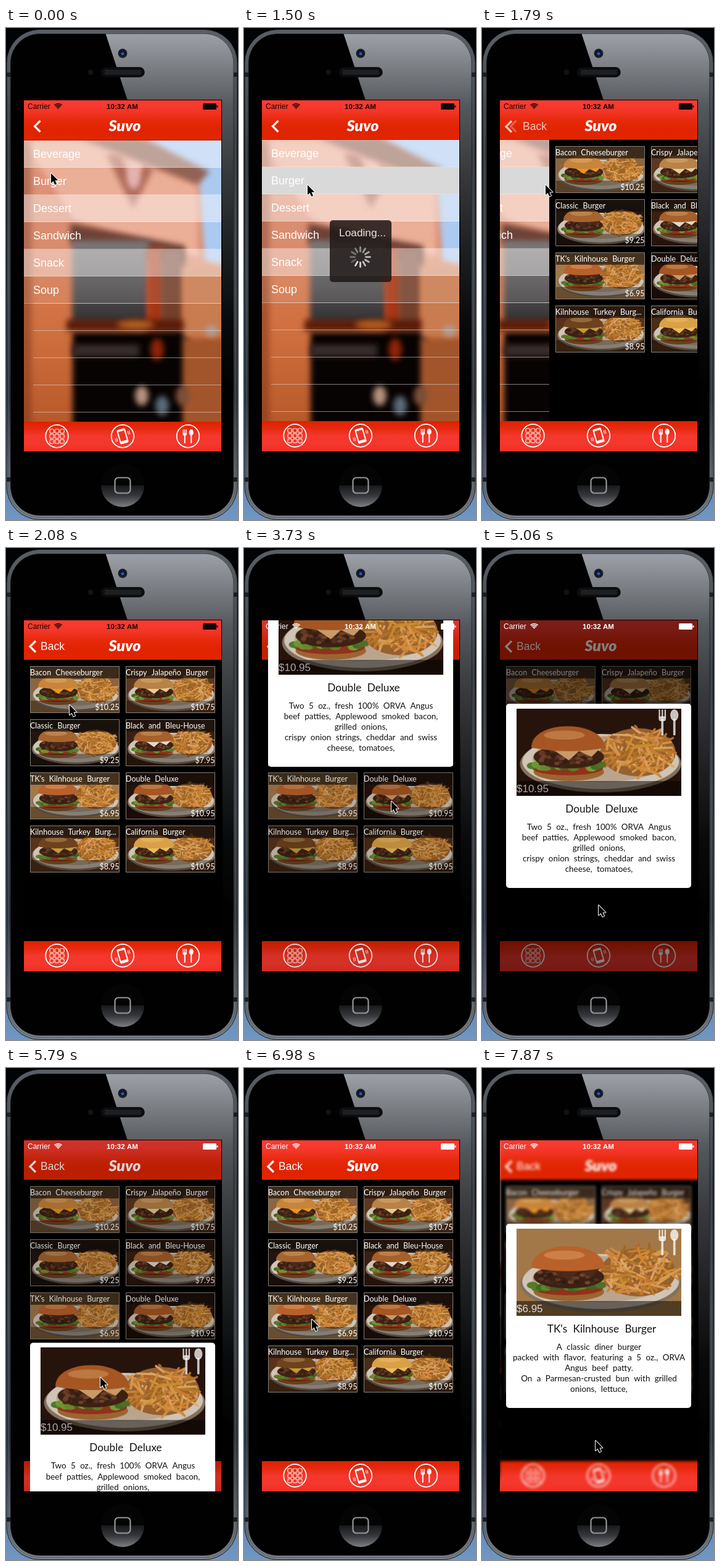
An HTML page with a canvas for the animation above (8000 ms loop, 376 by 796 pixels).

```html
<!DOCTYPE html>
<html lang="en">
<head>
<meta charset="utf-8">
<title>Menu app</title>
<style>
html, body { margin: 0; width: 376px; height: 796px; overflow: hidden; background: #000; }
canvas { display: block; }
</style>
</head>
<body>
<canvas id="stage" width="376" height="796"></canvas>
<script>
const W = 376, H = 796, LOOP = 8000, STEP = 148.4;
const SX = 29, SY = 117, SW = 320, SH = 568;
const SANS = '"Liberation Sans", Arial, sans-serif';
const HUMAN = 'Lato, "Open Sans", sans-serif';
const stage = document.getElementById('stage').getContext('2d');

// Easing; all times below are counted in steps.

const ramp = (k, from, to) => Math.min(1, Math.max(0, (k - from) / (to - from)));
const smooth = u => u * u * (3 - 2 * u);
const out = u => 1 - (1 - u) ** 2;

// Pointer moves: start, end, target x and y
const MOVES = [[0, 4, 103, 254], [14, 18, 230, 383], [18, 21, 239, 410], [29, 34, 189, 578],
  [37, 40, 135, 462], [42, 45, 110, 407], [49, 53, 184, 603]];

function pointerAt(k) {
  let x = 73, y = 235;
  for (const [from, to, tx, ty] of MOVES) {
    const u = ramp(k, from, to);
    x += (tx - x) * u;
    y += (ty - y) * u;
  }
  return [x, y];
}

// Drawing helpers

function layer(w, h, paint) {
  const c = document.createElement('canvas');
  c.width = w; c.height = h;
  paint(c.getContext('2d'));
  return c;
}

function random(seed) {
  return () => (seed = (seed * 16807) % 2147483647) / 2147483647;
}

function grad(c, y0, y1, ...stops) {
  const g = c.createLinearGradient(0, y0, 0, y1);
  stops.forEach((s, i) => g.addColorStop(i / (stops.length - 1), s));
  return g;
}

function rect(c, x, y, w, h, fill) { c.fillStyle = fill; c.fillRect(x, y, w, h); }

function rr(c, x, y, w, h, r, fill, stroke, lw = 1) {
  c.beginPath(); c.roundRect(x, y, w, h, r);
  if (fill) { c.fillStyle = fill; c.fill(); }
  if (stroke) { c.strokeStyle = stroke; c.lineWidth = lw; c.stroke(); }
}

function oval(c, x, y, rx, ry, fill) {
  c.beginPath(); c.ellipse(x, y, rx, ry, 0, 0, 7);
  c.fillStyle = fill; c.fill();
}

function trace(c, p) {
  c.beginPath();
  for (let i = 0; i < p.length; i += 2) c.lineTo(p[i], p[i + 1]);
}

function poly(c, fill, ...p) { trace(c, p); c.fillStyle = fill; c.fill(); }

function line(c, color, w, ...p) {
  trace(c, p);
  c.strokeStyle = color; c.lineWidth = w; c.stroke();
}

function arc(c, color, w, x, y, r, from = 0, to = 7) {
  c.beginPath(); c.arc(x, y, r, from, to);
  c.strokeStyle = color; c.lineWidth = w; c.stroke();
}

function text(c, s, x, y, font, fill, align = 'left', gap = 0) {
  c.font = font; c.fillStyle = fill; c.textAlign = align; c.wordSpacing = gap + 'px';
  c.fillText(s, x, y);
}

const phone = layer(W, H, c => {
  rect(c, 0, 0, W, H, grad(c, 200, H, '#020305', '#14253a', '#4d6f98', '#7096c2'));
  rr(c, 1, 2.5, 374, 793, 54, grad(c, 2, H, '#5d6268', '#30353a', '#3c4248', '#2c3136', '#7c838b'), '#15181b');
  rr(c, 4, 6, 368, 786, 51, null, '#555b62');
  for (const x of [1, 369])
    for (const y of [72, 727]) rect(c, x, y, 6, 7, '#1c1f22');
  rr(c, 7.5, 9.5, 361, 779, 47, '#010102', '#191c20');
  c.save();
  c.clip();
  const shine = grad(c, 9, 592, '#9da0a6', '#55585c', '#35373a', '#1d1f21', '#08090a', '#010102');
  poly(c, shine, 161, 8, 197, 117, 349, 117, 352, 562, 369, 592, 369, 8);
  c.restore();
  oval(c, 189, 41, 7.5, 7.5, '#1c1f24');
  oval(c, 189, 41, 5, 5, '#0c1430');
  oval(c, 189, 41.5, 2.6, 2.6, '#2d56a8');
  oval(c, 137, 71.5, 4.5, 4.5, '#101214');
  rr(c, 154, 64, 70, 15, 7.5, '#0d0e10', '#08090a', 1.5);
  for (let y = 68; y < 76; y += 2)
    for (let x = 160 + y % 4 / 2; x < 219; x += 2) rect(c, x, y, 1, 1, '#4d4f53');
  oval(c, 189, 740, 35, 35, '#040405');
  c.beginPath(); c.arc(189, 740, 35, 0, Math.PI);
  c.fillStyle = grad(c, 738, 775, '#141517', '#35373a', '#7d8084'); c.fill();
  rr(c, 176.5, 727.5, 25, 25, 5.5, null, '#94969a', 2.2);
  rect(c, 28, 116, 322, 570, '#000');
});

// Blurred house front behind the category list
const backdrop = layer(SW, SH, c => {
  c.translate(-SX, -SY);
  c.filter = 'blur(5px)';
  rect(c, 0, 100, W, 620, grad(c, 182, 636, '#db8a70', '#d67f5f', '#d0703f', '#b8592a'));
  poly(c, '#a3c4ef', 200, 160, 390, 160, 390, 392, 322, 376, 312, 240);
  poly(c, '#e9a58b', 28, 182, 120, 182, 310, 255, 312, 370, 110, 310);
  poly(c, '#84503f', 118, 176, 218, 176, 330, 232, 311, 253);
  poly(c, '#a65a45', 162, 204, 186, 204, 206, 250, 226, 218, 238, 230, 206, 292);
  oval(c, 207, 240, 11, 21, '#e0a9a8');
  rect(c, 24, 180, 17, 470, 'rgba(110,45,22,.45)');
  poly(c, '#5c2c20', 104, 316, 290, 352, 290, 384, 104, 350);
  rect(c, 107, 344, 125, 135, grad(c, 344, 478, '#6c6868', '#555354', '#343132'));
  rect(c, 228, 356, 28, 185, '#a93614');
  rect(c, 250, 358, 36, 160, '#74402b');
  rect(c, 108, 492, 188, 170, '#070302');
  rect(c, 98, 472, 225, 18, '#5a1c08');
  oval(c, 210, 480, 30, 7, '#b75f23');
  rect(c, 108, 512, 108, 20, '#382b2b');
  oval(c, 245, 520, 11, 18, '#8c2309');
  rect(c, 288, 392, 62, 110, '#c97c50');
  rect(c, 286, 502, 70, 150, '#a2552b');
  oval(c, 333, 490, 10, 9, '#aba09a');
  ['#b7917e', '#5b6976', '#7b5039'].forEach((fill, i) => oval(c, 220 + i * 33, 595 + i % 2 * 16, 11, 16, fill));
});

// Dishes: name, price, table, bun and filling colours

const DISHES = [
  ['Bacon Cheeseburger', '$10.25', '#8a6541', '#c8843b', '#e8981e'],
  ['Crispy Jalapeño Burger', '$10.75', '#5c3820', '#b98246', '#e3cc98'],
  ['Classic Burger', '$9.25', '#21160f', '#a5642f', '#4c2a18'],
  ['Black and Bleu-House', '$7.95', '#3b1f13', '#a5602b', '#e0d8c8'],
  ["TK's Kilnhouse Burger", '$6.95', '#a37848', '#b9612a', '#4a2a1a'],
  ['Double Deluxe', '$10.95', '#26130b', '#a55622', '#c99a68'],
  ['Kilnhouse Turkey Burg...', '$8.95', '#56331a', '#6e421c', '#c29a38'],
  ['California Burger', '$10.95', '#4a2c17', '#d9a045', '#e8bd5c']
].map(([name, price, table, bun, filling], i) => ({ name, price, photo: photo(table, bun, filling, i + 1) }));

function fries(c, rnd) {
  oval(c, 107, 38, 33, 21, '#96602f');
  c.lineCap = 'round';
  for (let i = 0; i < 110; i++) {
    const a = rnd() * 6.3, r = Math.sqrt(rnd()), turn = rnd() * 3.1, n = 5 + rnd() * 6;
    const x = 107 + Math.cos(a) * r * 31, y = 37 + Math.sin(a) * r * 19;
    const dx = Math.cos(turn) * n, dy = Math.sin(turn) * n * .7;
    line(c, `hsl(${28 + rnd() * 8} 62% ${38 + rnd() * 27}%)`, 1.9, x - dx, y - dy, x + dx, y + dy);
  }
}

function burger(c, bun, filling, rnd) {
  oval(c, 46, 55, 31, 8, '#9c6430');
  oval(c, 45, 52, 31, 6, '#93301a');
  for (let i = 0; i < 16; i++) oval(c, 14 + i * 4, 47 + rnd() * 5, 5, 3, `hsl(${75 + rnd() * 25} 50% ${24 + rnd() * 16}%)`);
  oval(c, 46, 42, 31, 10, '#3d2113');
  for (let i = 0; i < 50; i++) oval(c, 20 + rnd() * 52, 36 + rnd() * 12, 2.5, 1.5, `hsl(20 45% ${12 + rnd() * 20}%)`);
  poly(c, filling, 16, 32, 76, 32, 66, 42, 55, 37, 46, 45, 34, 37);
  c.beginPath();
  c.moveTo(13, 34); c.bezierCurveTo(13, 9, 76, 9, 78, 34);
  c.quadraticCurveTo(46, 40, 13, 34);
  c.fillStyle = bun; c.fill();
  oval(c, 42, 23, 18, 4, 'rgba(255,220,160,.25)');
}

function photo(table, bun, filling, seed) {
  return layer(290, 152, c => {
    const rnd = random(seed * 5003);
    c.scale(2, 2);
    rect(c, 0, 0, 145, 76, table);
    oval(c, 74, 48, 71, 25, '#83715f');
    oval(c, 74, 46, 69, 24, '#cfc4b5');
    oval(c, 74, 44, 60, 20, '#b9a58d');
    fries(c, rnd);
    burger(c, bun, filling, rnd);
  });
}

// App parts

function chevron(c, x, y, h) {
  c.lineCap = 'butt'; c.lineJoin = 'miter';
  line(c, '#fff', 3.2, x + h, y - h, x, y, x + h, y + h);
}

function navBar(c, oy, push) {
  rect(c, SX, SY, SW, 64 + oy, grad(c, SY, 181, '#f93d33', '#f5362a', '#e62a0c', '#e02300', '#e22600'));
  rect(c, SX, 180 + oy, SW, 1, '#b01c05');
  c.globalAlpha = 1 - push; chevron(c, 46.5, 159, 9);
  c.globalAlpha = push; chevron(c, 39, 159.5, 9);
  text(c, 'Back', 56 + 40 * (1 - push), 165, '17.5px ' + SANS, '#fff');
  c.globalAlpha = 1;
  text(c, 'Suvo', 192.5, 167, 'italic 900 25px ' + HUMAN, '#fff', 'center');
}

function cutlery(c, x, y, s, color) {
  c.save();
  c.translate(x, y); c.scale(s, s);
  c.lineCap = 'round';
  for (const dx of [-2.4, 0, 2.4]) line(c, color, 1.2, dx - 5, -10, dx - 5, -4);
  rr(c, -8, -5, 6, 4, 2, color);
  oval(c, 5, -6, 3.4, 4.8, color);
  for (const dx of [-5, 5]) line(c, color, 1.9, dx, -2, dx, 10);
  c.restore();
}

function tabBar(c, oy) {
  const y = 659.5 + oy;
  rect(c, SX, 636 + oy, SW, 49 - oy, grad(c, 636, 685, '#de2000', '#e62a10', '#f5382d', '#f4372c', '#ee3024'));
  for (const x of [82.5, 189, 295]) arc(c, '#fff', 1.8, x, y, 18.3);
  for (let i = 0; i < 9; i++)
    rr(c, 71 + i % 3 * 8.4, y - 11.5 + Math.floor(i / 3) * 8.4, 6.4, 6.4, 1.5, null, '#ffe2dc', 1.2);
  c.save();
  c.translate(189, y); c.rotate(-.28);
  rr(c, -7, -12, 14, 24, 2.5, '#fff');
  rect(c, -5, -8.5, 10, 16, '#ef3226');
  for (const side of [-1, 1])
    for (const r of [10, 12.5]) line(c, '#fff', 1, side * r, -side * 3 - 3, side * r, -side * 3 + 3);
  c.restore();
  cutlery(c, 295, y, 1.05, '#fff');
}

function statusBar(c, color) {
  text(c, 'Carrier', 35, 131, '12px ' + SANS, color);
  text(c, '10:32 AM', 188.5, 131, 'bold 11.6px ' + SANS, color, 'center');
  c.lineCap = 'butt';
  for (const r of [1, 3.5, 6, 8.5]) arc(c, color, 1.7, 84.5, 131, r, -2.35, -.79);
  rr(c, 319, 122, 22, 10, 1.5, color);
  rect(c, 341.5, 125.5, 2, 3, color);
}

function listView(c, oy, picked) {
  c.drawImage(backdrop, SX, SY);
  ['Beverage', 'Burger', 'Dessert', 'Sandwich', 'Snack', 'Soup'].forEach((name, i) => {
    const y = 181 + oy + i * 44;
    rect(c, SX, y, SW, 44, picked && i === 1 ? '#d9d9d9' : `rgba(255,255,255,${i % 2 ? .1 : .47})`);
    rect(c, SX, y + 43, SW, 1, 'rgba(255,255,255,.3)');
    text(c, name, 44, y + 28, '18px ' + SANS, '#fff');
  });
  for (let y = 444 + oy; y < 636; y += 44) rect(c, 44, y, 305, 1, 'rgba(225,225,225,.55)');
}

function hud(c) {
  rr(c, 139, 311, 100, 100, 5, 'rgba(30,24,23,.86)');
  text(c, 'Loading...', 192, 337, '17.3px ' + SANS, '#e6e6e6', 'center');
  c.lineCap = 'round';
  for (let i = 0; i < 12; i++) {
    const a = i * Math.PI / 6, x = Math.cos(a), y = Math.sin(a);
    line(c, `rgba(235,235,235,${.28 + .7 * ((i + 7) % 12) / 12})`, 2.8, 188.5 + x * 9, 370.5 + y * 9, 188.5 + x * 16, 370.5 + y * 16);
  }
}

const grid = layer(SW, SH, c => {
  c.translate(-SX, -SY);
  rect(c, SX, SY, SW, SH, '#000');
  DISHES.forEach((d, i) => {
    const x = 39 + i % 2 * 155, y = 191 + Math.floor(i / 2) * 86;
    c.drawImage(d.photo, x, y, 145, 76);
    rect(c, x, y, 145, 20, 'rgba(20,14,10,.66)');
    rect(c, x, y + 56, 145, 20, 'rgba(0,0,0,.36)');
    rr(c, x + .5, y + .5, 144, 75, 0, null, '#858078');
    text(c, d.name, x, y + 15, '12.5px ' + HUMAN, '#fff', 'left', 4);
    text(c, d.price, x + 144.5, y + 71, '12.5px ' + HUMAN, '#fff', 'right');
  });
});

const DELUXE = {
  dish: DISHES[5], priceColor: '#aaa',
  note: ['Two 5 oz., fresh 100% ORVA Angus', 'beef patties, Applewood smoked bacon,', 'grilled onions,',
    'crispy onion strings, cheddar and swiss', 'cheese, tomatoes,']
};
const KILNHOUSE = {
  dish: DISHES[4], priceColor: '#dcdcdc',
  note: ['A classic diner burger', 'packed with flavor, featuring a 5 oz., ORVA', 'Angus beef patty.',
    'On a Parmesan-crusted bun with grilled', 'onions, lettuce,']
};

function popup(c, { dish, priceColor, note }, dy) {
  c.save();
  c.translate(0, dy);
  rr(c, 39, 252, 300, 298, 5, '#fff');
  c.drawImage(dish.photo, 56, 260, 267, 141);
  rect(c, 56, 377, 267, 24, 'rgba(0,0,0,.5)');
  text(c, dish.price, 56, 395, '17px ' + SANS, priceColor);
  cutlery(c, 302, 282, 1.95, 'rgba(255,255,255,.75)');
  text(c, dish.name, 194, 428, '17.2px ' + HUMAN, '#111', 'center', 5);
  note.forEach((s, i) => text(c, s, 189.5, 456 + i * 17.1, '13.4px ' + HUMAN, '#111', 'center', 4));
  c.restore();
}

function pointer(c, x, y) {
  c.save();
  c.translate(x, y);
  trace(c, [0, 0, 0, 16, 3.6, 12.7, 6.2, 18.6, 9, 17.4, 6.5, 11.6, 11.4, 11.6]);
  c.closePath();
  c.lineJoin = 'round';
  c.strokeStyle = '#fff'; c.lineWidth = 2; c.stroke();
  c.fillStyle = '#000'; c.fill();
  c.restore();
}

const screen = layer(W, H, () => {});

function drawApp(c, k) {
  const oy = k < 1 ? 1 : 0, push = out(ramp(k, 10, 14));
  c.clearRect(0, 0, W, H);
  c.save();
  c.translate(-96 * push, 0);
  listView(c, oy, k >= 1);
  c.restore();
  if (push) c.drawImage(grid, SX + SW * (1 - push), SY);
  navBar(c, oy, push);
  tabBar(c, oy);
}

function draw(k) {
  const c = stage, fall = 433;
  const enter = ramp(k, 23.54, 28), leave = ramp(k, 37, 40);
  const blur = 2.2 * smooth(ramp(k, 47, 51));
  c.drawImage(phone, 0, 0);
  drawApp(screen.getContext('2d'), k);
  c.save();
  c.beginPath(); c.rect(SX, SY, SW, SH); c.clip();
  c.drawImage(screen, 0, 0);
  if (blur) {
    c.filter = `blur(${blur}px)`;
    c.drawImage(screen, 0, 0);
    c.filter = 'none';
  }
  c.globalAlpha = ramp(k, 0, 4) * (1 - ramp(k, 10, 11));
  hud(c);
  c.globalAlpha = 1;
  if (k >= 25) {
    rect(c, SX, SY, SW, SH, `rgba(0,0,0,${.5 * smooth(enter) * (1 - leave)})`);
    if (leave < 1) popup(c, DELUXE, fall * (out(enter) - 1 + leave * leave));
  }
  if (k > 47) popup(c, KILNHOUSE, fall * (out(ramp(k, 47, 51)) - 1));
  statusBar(c, k < 25 ? '#160503' : '#fff');
  pointer(c, ...pointerAt(k));
  c.restore();
}

let shown = -1;
function frame() {
  const k = Math.floor(performance.now() % LOOP / STEP);
  if (k !== shown) draw(shown = k);
  requestAnimationFrame(frame);
}
frame();
</script>
</body>
</html>
```
